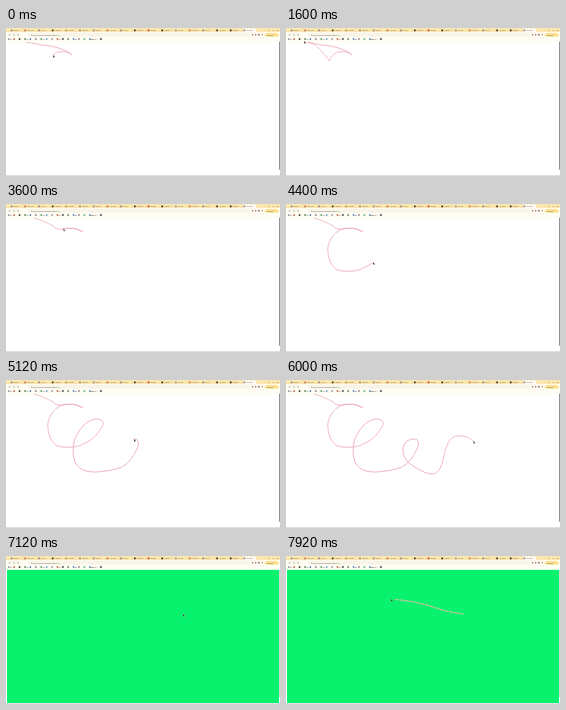
These frames come from a looping animation (274x148 px, 8 s). An HTML page:

```html
<!DOCTYPE html>
<html lang="en">
<head>
<meta charset="utf-8">
<style>
html, body { margin: 0; width: 100%; height: 100%; overflow: hidden; background: #fff; }
svg { display: block; width: 100vw; height: 100vh; }
text { font-family: Roboto, Arial, sans-serif; font-size: 2.1px; fill: #6f6a5c; }
.ink { fill: none; stroke-linejoin: round; stroke-linecap: round; }
</style>
</head>
<body>
<svg id="stage" viewBox="0 0 274 148">
  <defs><clipPath id="view"><rect x="1" y="13.6" width="272" height="133.4"/></clipPath></defs>
  <rect width="274" height="148" fill="#fff"/>
  <rect id="page" x="1" y="13.6" width="272" height="133.4"/>
  <g clip-path="url(#view)">
    <path id="ink" class="ink"/>
  </g>
  <g id="chrome"></g>
  <path id="cursor" d="M0 0V2.5L.6 2 1.1 2.9 1.6 2.7 1.2 1.8H1.9Z" fill="#222" stroke="#fff" stroke-width=".15"/>
</svg>
<script>
const LOOP = 8000, STEP = 80, RELOAD = 2160, FLASH = 7120;
const $ = id => document.getElementById(id);
const chrome = $('chrome');

function add(tag, attrs, label) {
  const el = document.createElementNS('http://www.w3.org/2000/svg', tag);
  for (const k in attrs) el.setAttribute(k, attrs[k]);
  if (label) el.textContent = label;
  chrome.appendChild(el);
  return el;
}
const box = (x, y, width, height, fill, rx = 0) => add('rect', { x, y, width, height, fill, rx });
const dot = (cx, cy, r, fill) => add('circle', { cx, cy, r, fill });
const label = (x, y, s, fill = '#77705f') => add('text', { x, y, fill }, s);

// Browser frame
box(0, 0, 274, 4.4, '#fae6ae');
box(0, 4.4, 274, 9.2, '#fffcf3');
box(22, 5, 222, 3.6, '#f8f4e8', 1.8);
box(237, .6, 13.4, 4, '#fffcf3', .8);
const tints = ['#7d8a99', '#c4694d', '#7b8288', '#2b2b2b', '#b58b4a', '#8a8170'];
const titles = ['Inbox', 'Sketch', 'Notes', 'Canvas', 'Docs', 'Lesson'];
let favicon;
for (let i = 0; i < 18; i++) {
  const x = 5.5 + i * 13.7;
  const fill = i === 10 ? '#d52b2b' : i === 11 || i === 16 ? '#222' : tints[i % 6];
  favicon = box(x - .8, 1.5, 1.7, 1.7, fill, .3);
  label(x + 2, 3.1, titles[(i * 5) % 6]);
  if (i < 17) box(x + 11.4, 1.4, .25, 1.9, '#cdbb88');
}
[262, 266.5, 271].forEach(x => box(x, 2, 1.1, .6, '#746b51'));
[3.5, 8, 12].forEach(x => add('circle', { cx: x, cy: 6.8, r: .65, fill: 'none', stroke: '#77705f', 'stroke-width': .35 }));
label(25, 7.6, 'file:///projects/draw/index.html');
['#777', '#b4483c', '#333', '#cc8a30'].forEach((c, i) => dot(246.5 + i * 3.2, 6.8, .75, c));
box(259, 5, 13.5, 3.7, '#fbe08c', 1.5);
label(260.5, 7.6, 'Update');
const marks = ['#8a8a8a', '#c5563f', '#222', '#4c7a4c', '#3d6fb0', '#777', '#36a36a', '#4886c8'];
for (let i = 0; i < 16; i++) {
  box(2 + i * 5.4, 10.2, 1.6, 1.6, marks[i % 8], .3);
  if (i % 3 === 0) label(4 + i * 5.4, 11.8, 'ab');
}
label(83.5, 11.8, 'Lessons', '#3c8650');
box(94, 10.2, 1.8, 1.6, '#333', .3);
const bar = box(273, 13.6, 1, 128, '#929292');
box(0, 147, 274, 1, '#dedede');

// Each leg: start time, end time, then the points reached in between.
function track(start, legs) {
  const knots = [start];
  for (const [t0, t1, pts] of legs) {
    const p = pts.split(' ').map(s => s.split(',').map(Number));
    p.forEach(([x, y], i) => knots.push([t0 + (t1 - t0) * (i + 1) / p.length, x, y]));
  }
  return knots;
}

function at(knots, t) {
  const n = knots.length - 1;
  if (t <= knots[0][0]) return knots[0].slice(1);
  if (t >= knots[n][0]) return knots[n].slice(1);
  let i = 0;
  while (knots[i + 1][0] < t) i++;
  const a = knots[Math.max(0, i - 1)], b = knots[i], c = knots[i + 1], d = knots[Math.min(n, i + 2)];
  const u = (t - b[0]) / (c[0] - b[0]);
  return [1, 2].map(k => b[k] + .5 * u * (c[k] - a[k] +
    u * (2 * a[k] - 5 * b[k] + 4 * c[k] - d[k] + u * (3 * (b[k] - c[k]) + d[k] - a[k]))));
}

function trace(knots, end) {
  const pts = [];
  for (let t = knots[0][0]; t < end; t += 8) pts.push(at(knots, t));
  pts.push(at(knots, end));
  return 'M' + pts.map(p => p.map(v => v.toFixed(2)).join(' ')).join('L');
}

const first = track([-800, 20, 14], [
  [-800, 0, '34,16.5 49,19 60,23 66,27 62,24.5 56,23.7 50,25 47,27'],
  [0, 400, '44.8,30 43.3,32.6'],
  [400, 720, '43.3,32.6'],
  [720, 1600, '40,28.5 34,21.5 28,16.5 22,14.2 18,13'],
  [1600, 1920, '14.5,10.5 11.5,8']
]);
const second = track([RELOAD, 11.5, 8], [
  [2160, 2880, '19,11 28,14 37,17 45,20.8'],
  [2880, 3280, '52,25 62,24.6 70,25 77,28'],
  [3280, 3760, '70,24.8 62,24.2 55,25.5 47,32'],
  [3760, 4640, '42,43 44,57 52,66 70,66.5 86,59 94.5,49 97,42'],
  [4640, 5120, '90,39 78,45 68,62 69,82 80,91 100,91 119,85 130,71 132.3,62 128,59'],
  [5120, 5520, '120,62 117,71 121,81 134,90 146,94 153,90 157,80'],
  [5520, 6400, '159,71 164,60 172,55.8 184,58.5 192,67 195,77 190,86.5 177,89.5'],
  [6400, 7040, '166,84 162.5,74 164.5,64 170,57.5 177,58']
]);
const third = track([7600, 177, 58], [
  [7600, 7920, '160,55 144,50 128,46 114,44 105,43']
]);

function draw(t) {
  const green = t >= FLASH;
  const path = green ? third : t < RELOAD ? first : second;
  const [x, y] = at(path, t);
  const ink = $('ink');
  ink.setAttribute('d', green && t <= 7600 ? '' : trace(path, green ? t - 40 : t));
  ink.setAttribute('stroke', green ? '#c9c39f' : '#eba3b1');
  ink.setAttribute('stroke-width', green ? 1.2 : .8);
  ink.setAttribute('stroke-dasharray', green ? '3.5 1.6' : 'none');
  $('page').setAttribute('fill', green ? '#08f26e' : '#fff');
  bar.setAttribute('fill', green ? '#c9d8cd' : '#929292');
  favicon.setAttribute('fill', t >= 2080 && t < 2320 ? '#3d76d2' : '#8a8170');
  $('cursor').setAttribute('transform', `translate(${x} ${y})`);
}

const begin = performance.now();
function tick(now) {
  const t = Math.max(0, now - begin) % LOOP;
  draw(Math.floor(t / STEP) * STEP);
  requestAnimationFrame(tick);
}
draw(0);
requestAnimationFrame(tick);
</script>
</body>
</html>
```
